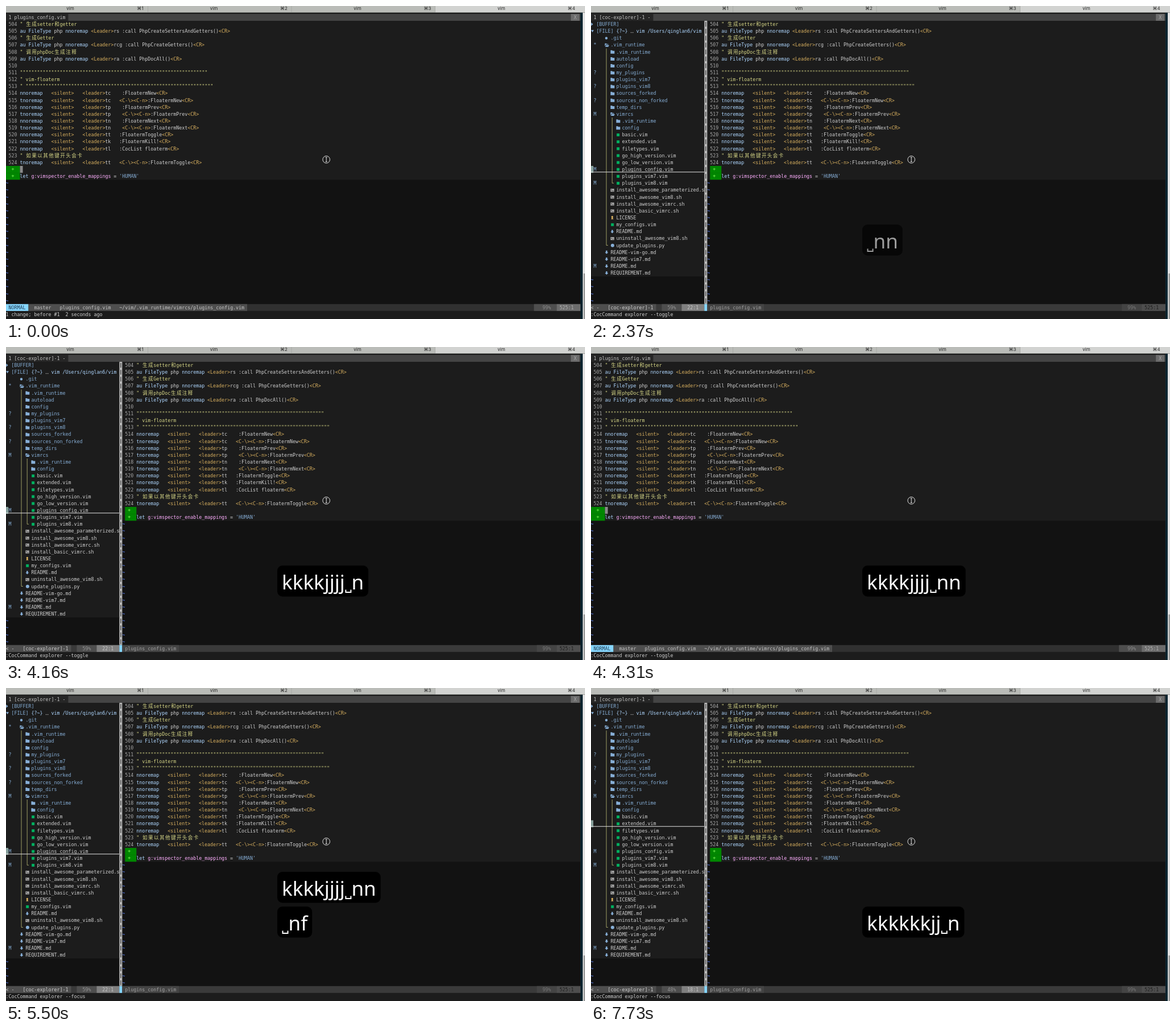
Write an HTML page with a canvas that moves like this. It is 1018 by 550 pixels and loops after 8 s.

```html
<!DOCTYPE html>
<html lang="en">
<head>
<meta charset="utf-8">
<title>Vim file explorer</title>
<style>
html, body { margin: 0; width: 100%; height: 100%; overflow: hidden; background: #121212; }
canvas { display: block; width: 1018px; height: 550px; }
</style>
</head>
<body>
<canvas id="stage"></canvas>
<script>
const W = 1018, H = 550, LOOP = 8000;
const CELL = 4.993, LEFT = -0.4, ROW = 12.14, TOP = 13.9, EDGE = 1010;
const MONO = '8.3px "DejaVu Sans Mono", monospace';
const CJK = '8.6px "Noto Sans CJK SC", "Noto Sans CJK", sans-serif';
const C = {
  bg: '#1c1c1c', empty: '#121212', text: '#d0d0d0', comment: '#d7d787', blue: '#87afd7',
  ident: '#ffafff', key: '#afd7ff', special: '#d7af5f', num: '#a8a8a8', tilde: '#5f87ff',
  bar: '#444444', green: '#00af5f'
};

const canvas = document.getElementById('stage');
const g = canvas.getContext('2d');
const dpr = window.devicePixelRatio || 1;
canvas.width = W * dpr;
canvas.height = H * dpr;

const colX = c => LEFT + c * CELL;
const rowY = r => TOP + r * ROW;

function rect(x, y, x2, y2, color) {
  g.fillStyle = color;
  g.fillRect(x, y, x2 - x, y2 - y);
}

function cells(c, r, c2, color, rows = 1) {
  rect(c ? colX(c) : 0, rowY(r), colX(c2), rowY(r + rows), color);
}

// Writes on the character grid; wide characters take two cells. Returns the next column.
function put(s, c, r, color = C.text) {
  g.fillStyle = color;
  for (const part of s.match(/[\x20-\x7e]+|[^\x20-\x7e]/g)) {
    const wide = part > '\u2e80';
    g.font = wide ? CJK : MONO;
    g.fillText(part, colX(c) + (wide ? 0.7 : 0), rowY(r) + 9);
    c += wide ? 2 : part.length;
  }
  return c;
}

function map(cmd, keys, gap, action) {
  return `${cmd}   <silent>   <leader>${keys}${' '.repeat(gap)}${action}<CR>`;
}

const ESC = '<C-\\><C-n>';
const RULE = '"'.repeat(66);
const code = [
  '" 生成setter和getter',
  'au FileType php nnoremap <Leader>rs :call PhpCreateSettersAndGetters()<CR>',
  '" 生成Getter',
  'au FileType php nnoremap <Leader>rcg :call PhpCreateGetters()<CR>',
  '" 调用phpDoc生成注释',
  'au FileType php nnoremap <Leader>ra :call PhpDocAll()<CR>',
  '',
  RULE,
  '" vim-floaterm',
  '" ' + RULE,
  map('nnoremap', 'tc', 4, ':FloatermNew'),
  map('tnoremap', 'tc', 3, ESC + ':FloatermNew'),
  map('nnoremap', 'tp', 4, ':FloatermPrev'),
  map('tnoremap', 'tp', 4, ESC + ':FloatermPrev'),
  map('nnoremap', 'tn', 4, ':FloatermNext'),
  map('tnoremap', 'tn', 4, ESC + ':FloatermNext'),
  map('nnoremap', 'tt', 3, ':FloatermToggle'),
  map('nnoremap', 'tk', 3, ':FloatermKill!'),
  map('nnoremap', 'tl', 3, ':CocList floaterm'),
  '" 如果以其他键开头会卡',
  map('tnoremap', 'tt', 3, ESC + ':FloatermToggle'),
  '',
  "let g:vimspector_enable_mappings = 'HUMAN'"
];

function tokenColor(t) {
  if (/^<.+>$/.test(t)) return C.special;
  if (/^g:/.test(t)) return C.ident;
  if (t[0] === "'") return C.blue;
  return /^(au|FileType|[nt]noremap|let)$/.test(t) ? C.key : C.text;
}

function codeLine(s, c, r) {
  if (s[0] === '"') return put(s, c, r, C.comment);
  for (const t of s.match(/<[^>]+>|g:\w+|'\w+'|\w+|\s+|[^\s\w<]+/g) || []) c = put(t, c, r, tokenColor(t));
}

function editor(c0) {
  rect(c0 ? colX(c0) : 0, rowY(1), EDGE, rowY(24), C.bg);
  code.forEach((s, i) => {
    const r = i + 1;
    if (i < 21) put(String(504 + i), c0 + 1, r, C.num);
    else {
      cells(c0 ? c0 + 1 : 0, r, c0 + 5, '#008700');
      put('+', c0 + 2, r, '#87ff5f');
    }
    codeLine(s, c0 + 5, r);
  });
  for (let r = 24; r < 42; r++) put('~', c0, r, C.tilde);
}

// Each entry: depth, icon, name, git mark
const tree = `
1 git .git
1 open .vim_runtime *
2 dir .vim_runtime
2 dir autoload
2 dir config
2 dir my_plugins ?
2 dir plugins_vim7
2 dir plugins_vim8 ?
2 dir sources_forked
2 dir sources_non_forked ?
2 dir temp_dirs
2 open vimrcs M
3 dir .vim_runtime
3 dir config
3 vim basic.vim
3 vim extended.vim
3 vim filetypes.vim
3 vim go_high_version.vim
3 vim go_low_version.vim
3 vim plugins_config.vim M
3 vim plugins_vim7.vim
3 vim plugins_vim8.vim M
2 sh install_awesome_parameterized.s
2 sh install_awesome_vim8.sh
2 sh install_awesome_vimrc.sh
2 sh install_basic_vimrc.sh
2 key LICENSE
2 vim my_configs.vim
2 md README.md
2 sh uninstall_awesome_vim8.sh
2 py update_plugins.py
1 md README-vim-go.md
1 md README-vim7.md
1 md README.md M
1 md REQUIREMENT.md`.trim().split('\n').map(s => s.split(' '));

function poly(color, x, y, ...pts) {
  g.fillStyle = color;
  g.beginPath();
  for (let i = 0; i < pts.length; i += 2) g.lineTo(x + pts[i], y + pts[i + 1]);
  g.fill();
}

function disc(x, y, r, color) {
  g.fillStyle = color;
  g.beginPath();
  g.arc(x, y, r, 0, 7);
  g.fill();
}

// x is the left edge, y the middle
const icons = {
  git: (x, y) => disc(x + 2.6, y, 2.2, C.blue),
  dir: (x, y) => poly(C.blue, x, y, 0, -3, 2.8, -3, 3.6, -2, 7, -2, 7, 3, 0, 3),
  open: (x, y) => {
    poly(C.blue, x, y, 0, -3, 2.6, -3, 3.4, -2, 6, -2, 6, -0.8, 1.7, -0.8, 0, 2.4);
    poly(C.blue, x, y, 2, 0, 7.5, 0, 6, 3, 0.6, 3);
  },
  vim: (x, y) => rect(x + 0.8, y - 2.5, x + 5.8, y + 2.5, C.green),
  sh: (x, y) => {
    rect(x, y - 2.5, x + 6.4, y + 2.7, '#a8a8a8');
    rect(x + 1, y - 0.9, x + 2.6, y + 0.3, '#303030');
    rect(x + 3, y + 0.7, x + 5.2, y + 1.5, '#303030');
  },
  key: (x, y) => {
    disc(x + 3, y - 1.8, 1.6, C.special);
    poly(C.special, x, y, 2, -1, 4, -1, 4.8, 3.4, 3, 2, 1.2, 3.4);
  },
  md: (x, y) => poly(C.blue, x, y, 1.7, -3, 4.3, -3, 4.3, -0.2, 6, -0.2, 3, 3, 0, -0.2, 1.7, -0.2),
  py: (x, y) => disc(x + 3.5, y, 3, C.blue)
};

function guide(x, r1, r2) {
  g.strokeStyle = '#afaf6f';
  g.lineWidth = 0.9;
  g.beginPath();
  g.moveTo(x, rowY(r1));
  g.lineTo(x, rowY(r2) + 6);
  g.lineTo(x + 2.8, rowY(r2) + 6);
  g.stroke();
}

function explorer(row) {
  rect(0, rowY(1), colX(40), rowY(38), C.bg);
  poly(C.blue, 0, rowY(1) + 6, 0.3, -3, 3.6, 0, 0.3, 3);
  poly(C.blue, 0, rowY(2) + 6, 0, -2, 5, -2, 2.5, 2);
  put('[BUFFER]', 2, 1, C.blue);
  put('[FILE]', 2, 2, C.blue);
  put('{?~}', 9, 2, C.key);
  for (const x of [70, 73]) rect(x, rowY(2) + 7.8, x + 1.2, rowY(2) + 9, C.text);
  put('vim /Users/qinglan6/vim', 16, 2, C.key);
  guide(27, 5, 33);
  guide(37.2, 15, 24);

  if (row) cells(0, row, 0.9, '#87a09c');
  tree.forEach(([depth, icon, name, mark], i) => {
    const r = i + 3, c = 3 + depth * 2;
    icons[icon](colX(c) - 0.2, rowY(r) + 6.2);
    put(name, c + 2, r, /git|dir|open/.test(icon) ? C.blue : C.text);
    if (mark) put(mark, 1, r, C.blue);
  });
  if (row) rect(0, rowY(row) + 10.3, colX(40), rowY(row) + 11.3, '#e4e4e4');
  for (let r = 38; r < 42; r++) put('~', 0, r, C.tilde);

  rect(colX(40), rowY(1), colX(41), rowY(42), '#bcbcbc');
  for (let r = 1; r < 42; r++) rect(201.3, rowY(r) + 2, 202.4, rowY(r) + 10.3, '#262626');
}

function statusEnd() {
  cells(186, 42, 194, '#4e4e4e');
  rect(colX(194), rowY(42), EDGE, rowY(43), '#6c6c6c');
}

function status(open, row) {
  rect(0, rowY(42), EDGE, rowY(43), open ? '#3a3a3a' : '#303030');
  if (!open) {
    cells(0, 42, 8, '#87d7ff');
    cells(8, 42, 85, '#4e4e4e');
    put('NORMAL', 1, 42, '#1c3a50');
    put('master', 10, 42, '#c6c6c6');
    put('plugins_config.vim', 19, 42, '#c6c6c6');
    put('~/vim/.vim_runtime/vimrcs/plugins_config.vim', 40, 42, '#c6c6c6');
    statusEnd();
    put('99%', 189, 42, '#8a8a8a');
    put('525:1', 195, 42, '#b2b2b2');
    return;
  }
  cells(0, 42, 23, '#4e4e4e');
  cells(25, 42, 32, '#4e4e4e');
  cells(32, 42, 40, '#808080');
  cells(40, 42, 41, '#87d7ff');
  cells(41, 42, 61, '#444444');
  cells(187, 42, 194, '#444444');
  rect(colX(194), rowY(42), EDGE, rowY(43), '#4e4e4e');
  put('< -', 0, 42, '#c6c6c6');
  put('[coc-explorer]-1', 6, 42, '#d0d0d0');
  put(Math.floor(row / 37 * 100) + '%', 27, 42, '#949494');
  put(row + ':1', 34, 42, '#c6c6c6');
  put('plugins_config.vim', 42, 42, '#a0a0a0');
  put('99%', 189, 42, '#767676');
  put('525:1', 195, 42, '#1c1c1c');
}

function chrome() {
  rect(0, 0, W, 11.4, '#babcb8');
  rect(754.5, 0, W, 11.4, '#d2d3d1');
  rect(0, 11, W, 11.8, '#8e908d');
  for (const x of [249, 501.5, 754]) rect(x, 0, x + 0.8, 11, '#a4a6a2');
  g.fillStyle = '#262626';
  g.font = '8px "Inter", sans-serif';
  g.textAlign = 'center';
  [113, 365.5, 618, 871].forEach((x, i) => {
    g.fillText('vim', x, 6.6);
    g.fillText('⌘' + (i + 1), x + 123, 6.6);
  });
  g.textAlign = 'left';
  rect(EDGE, 11.8, 1014, H, '#0b2530');
  rect(1014, 11.8, W, H, '#e2e2e2');
  rect(1015.5, 470, W, H, '#9a9a9a');
}

function pointer() {
  g.strokeStyle = '#e4e4e4';
  g.lineWidth = 1;
  g.beginPath();
  g.arc(563.2, 269.8, 6.3, 0, 7);
  g.moveTo(563.2, 266.2);
  g.lineTo(563.2, 273.4);
  g.moveTo(561.6, 266);
  g.lineTo(564.8, 266);
  g.moveTo(561.6, 273.6);
  g.lineTo(564.8, 273.6);
  g.stroke();
}

// Key caption; level 1 stands one line above level 0. "_" is the space sign.
function caption(keys, level = 0, alpha = 1) {
  const space = 11.5, x0 = 477, y = 384 - level * 61;
  g.font = '35px "Noto Sans", "Open Sans", sans-serif';
  const parts = keys.match(/_|[^_]+/g);
  const width = p => p === '_' ? space : g.measureText(p).width;
  const total = parts.reduce((sum, p) => sum + width(p), 0);
  g.globalAlpha = alpha;
  g.fillStyle = '#000';
  g.beginPath();
  g.roundRect(x0, y, total + 16, 54.5, 9);
  g.fill();
  g.fillStyle = g.strokeStyle = '#fff';
  g.lineWidth = 2;
  let x = x0 + 8;
  for (const p of parts) {
    if (p === '_') {
      g.beginPath();
      g.moveTo(x + 1.5, y + 42.5);
      g.lineTo(x + 1.5, y + 47);
      g.lineTo(x + 10.5, y + 47);
      g.lineTo(x + 10.5, y + 42.5);
      g.stroke();
    } else g.fillText(p, x, y + 42);
    x += width(p);
  }
  g.globalAlpha = 1;
}

// Key presses in ms; a caption is a run of presses
const runs = [
  { keys: '_nn', at: [140, 290, 440], fade: [2370, 2520] },
  { keys: 'kkkkjjjj_nn', at: [2520, 2670, 2820, 2960, 3260, 3410, 3560, 3710, 4010, 4160, 4310], fade: [6250, 6250] },
  { keys: '_nf', at: [5210, 5360, 5500], fade: [7150, 7440] },
  { keys: 'kkkkkkjj_n', at: [6250, 6400, 6550, 6700, 6850, 7000, 7150, 7290, 7590, 7730], fade: [LOOP, LOOP] }
];

function typed(run, t) {
  return run.keys.slice(0, run.at.filter(a => a <= t).length);
}

function captions(t) {
  const shown = runs.filter(r => r.at[0] <= t && t < r.fade[1]);
  shown.forEach((r, i) => {
    const alpha = t < r.fade[0] ? 1 : t < r.fade[0] + 140 ? 0.6 : 0.2;
    caption(typed(r, t), shown.length - 1 - i, alpha);
  });
}

function cursorRow(t) {
  const moves = [runs[1], runs[3]].map(r => typed(r, t)).join('');
  return 22 + moves.split('j').length - moves.split('k').length;
}

function draw(t) {
  const open = t >= 590 && t < 4310 || t >= 5500;
  const row = cursorRow(t);
  g.setTransform(dpr, 0, 0, dpr, 0, 0);
  rect(0, 0, W, H, C.empty);
  chrome();
  rect(0, 11.8, EDGE, rowY(0), C.bg);
  rect(0, rowY(0), EDGE, rowY(1), C.bar);
  cells(0, 0, 22, '#262626');
  put(open ? '1 [coc-explorer]-1 -' : '1 plugins_config.vim', 1, 0, '#c6c6c6');
  cells(199, 0, 202, '#6c6c6c');
  put('X', 200, 0, '#a8a8a8');

  editor(open ? 41 : 0);
  if (open) explorer(row);
  else cells(5, 22, 6, '#8a8a8a');
  status(open, row);
  rect(0, rowY(43), EDGE, H, C.bg);
  put(t < 590 ? '1 change; before #1  2 seconds ago' :
    ':CocCommand explorer --' + (t < 5500 ? 'toggle' : 'focus'), 0, 43);
  pointer();
  captions(t);
}

const start = performance.now();
function tick() {
  draw((performance.now() - start) % LOOP);
  requestAnimationFrame(tick);
}
tick();
</script>
</body>
</html>
```
